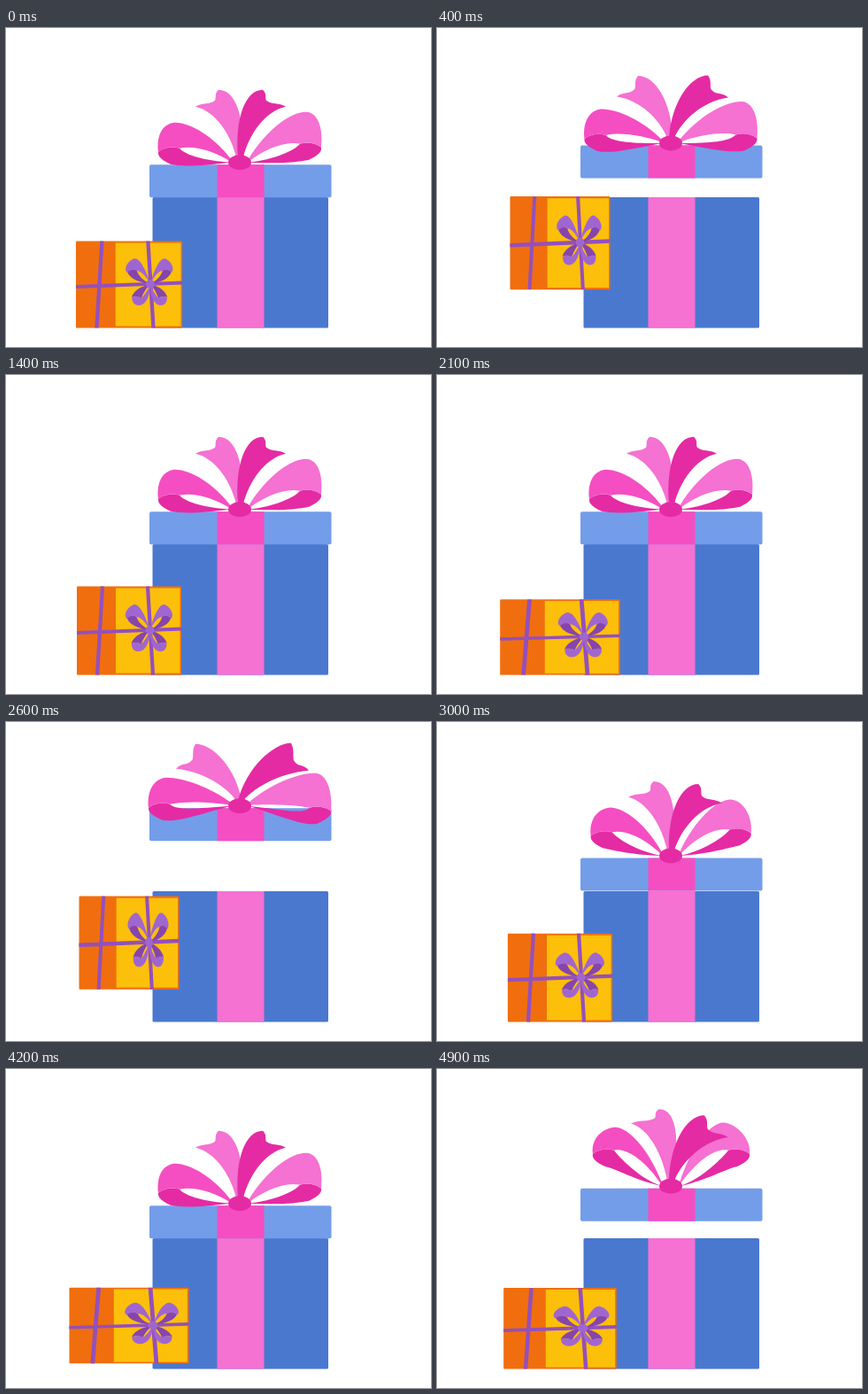
Animation, 480 px wide and 360 px high, one loop 5 s. Source, as an HTML page:

```html
<!DOCTYPE html>
<html lang="en">
<head>
<meta charset="utf-8">
<title>Jumping gifts</title>
<style>
  html, body { margin: 0; width: 100%; height: 100%; overflow: hidden; background: #fff; }
  svg { display: block; width: 100vw; height: 100vh; }
</style>
</head>
<body>
<svg viewBox="0 0 480 360">
  <rect x="165.5" y="191" width="198.5" height="147.5" rx="1.5" fill="#4a78cf"/>
  <rect x="238.5" y="191" width="53" height="147.5" fill="#f571d2"/>

  <g id="lid">
    <rect x="162" width="205.5" height="37" rx="2" fill="#739de9"/>
    <rect x="238.5" width="53" height="37" fill="#f54ec2"/>
    <g transform="translate(264 -2.5)">
      <path id="under-left" fill="#e42ba4"/>
      <path id="loop-left" fill="#f54ec2"/>
      <path id="under-right" fill="#e42ba4"/>
      <path id="loop-right" fill="#f571d2"/>
      <path id="tail-left" fill="#f571d2"/>
      <path id="tail-right" fill="#e42ba4"/>
      <ellipse rx="13" ry="8.5" fill="#e42ba4"/>
    </g>
  </g>

  <!-- Small gift: origin at the middle of its base -->
  <g id="gift">
    <rect x="-59" y="-100" width="118" height="100" rx="1" fill="#f06e0e"/>
    <rect x="-15" y="-98" width="72.5" height="96" fill="#fcbf0a"/>
    <path d="M-30-100L-36 0M-59-47.5L59-52M21-100L27 0" fill="none" stroke="#9450bb" stroke-width="4.2"/>
  </g>
  <g id="knot">
    <g id="wing">
      <path fill="#8645ad" d="M-26-14C-22-18-18-17-15-15C-13-8-6-3 0 0C-10-2-22-4-26-14Z"/>
      <path fill="#a066d0" d="M0 0C-4-14-12-32-19-28.500C-27-25-30-16-26-13C-22-17-18-17-15-15C-10-15-4-8 0 0Z"/>
      <path fill="#8645ad" d="M0 0C-8 2-18 6-21 15C-17 13-13 14-10 16C-8 10-4 4 0 0Z"/>
      <path fill="#a066d0" d="M0 0C0 12-4 24-13 24C-18 24-21 20-20.500 15C-16 13-12 14-10 16C-6 12-2 6 0 0Z"/>
    </g>
    <use href="#wing" transform="scale(-.92 1)"/>
    <circle r="5" fill="#a066d0"/>
  </g>
</svg>
<script>
const LOOP = 5000, HOP = 2000, STEP = 100;
const $ = id => document.getElementById(id);

// Key points of each side, from the knot: loop top, loop end, tail tip, tail top
const poses = {
  rest: {
    left: [[-74, -45], [-92, -12], [-50, -63], [-24, -82]],
    right: [[76, -57], [92, -17], [52, -63], [26, -82]]
  },
  flat: {
    left: [[-84, -32], [-103, 2], [-72, -42], [-50, -70]],
    right: [[86, -37], [103, 6], [78, -40], [58, -71]]
  },
  tall: {
    left: [[-64, -67], [-88, -37], [-45, -71], [-13, -87]],
    right: [[60, -72], [89, -37], [65, -55], [38, -80]]
  }
};

const mix = (a, b, k) => a + (b - a) * k;

function ease(t, from, to) {
  const k = Math.min(1, Math.max(0, (t - from) / (to - from)));
  return (1 - Math.cos(Math.PI * k)) / 2;
}

// 1 plus soft pulses, each [size, centre, width]
const wobble = (t, ...pulses) => pulses.reduce(
  (sum, [size, mid, width]) => sum + size * Math.exp(-(((t - mid) / width) ** 2)), 1);

function setPath(id, start, ...curves) {
  $(id).setAttribute('d', `M${start}C${curves.join(' ')}Z`);
}

// s is -1 on the left and 1 on the right
function drawLoop(side, s, [tx, ty], [ex, ey]) {
  const [hx, hy] = [ex - s * 24, ey - 4];
  const [bx, by] = [ex * .85, ey + 14];
  const fold = [[ex - s * 8, ey - 6], [hx + s * 7, hy - 2], [hx, hy]];
  setPath('loop-' + side, [s * 10, -4],
    [tx * .4, ty * .66], [tx * .77, ty * 1.02], [tx, ty],
    [tx + s * 15, ty + 2], [ex + s * 2, ey - 16], [ex, ey],
    ...fold,
    [hx * .74, hy - 4], [hx * .38, hy * .5 - 3], [s * 10, -1]);
  setPath('under-' + side, [ex, ey],
    ...fold,
    [hx * .9, hy + 8], [hx * .57, hy * .3 + 3], [s * 10, 0],
    [bx * .55, by * .45 + 3], [bx * .82, by + 3], [bx, by],
    [bx + s * 8, by - 4], [ex + s, ey + 6], [ex, ey]);
}

function drawTail(side, s, tip, top) {
  const between = (kx, ky) => [mix(tip[0], top[0], kx), mix(tip[1], top[1], ky)];
  setPath('tail-' + side, [s * 4, -6],
    [tip[0] * .2, tip[1] * .5], [tip[0] * .55, tip[1] * .92], tip,
    between(.3, .26), between(.62, .1), between(.85, .37),
    between(.92, .58), between(.8, .74), top,
    [top[0] - s * 20, top[1]], [top[0] * .4 - s * 16, top[1] * .6], [-s * 2, -6]);
}

// Above 0 the bow flattens, below 0 it stretches upwards.
function drawBow(pose) {
  const goal = pose > 0 ? poses.flat : poses.tall;
  for (const [side, s] of [['left', -1], ['right', 1]]) {
    const [loopTop, loopEnd, tailTip, tailTop] = poses.rest[side].map(
      (point, i) => point.map((v, j) => mix(v, goal[side][i][j], Math.abs(pose))));
    drawLoop(side, s, loopTop, loopEnd);
    drawTail(side, s, tailTip, tailTop);
  }
}

function drawLid(t) {
  const lift = 63 * (ease(t, 200, 700) - ease(t, 700, 1020));
  $('lid').setAttribute('transform', `translate(0 ${154.2 - lift})`);
  drawBow(t < 750 ? ease(t, 200, 600) : ease(t, 880, 1100) - 1);
}

function drawGift(t) {
  const sy = wobble(t, [-.19, 150, 100], [.07, 500, 180], [-.2, 825, 82]);
  const sx = sy ** -.87;
  const base = 338.5 - Math.max(0, 46 * (1 - ((t - 470) / 290) ** 2));
  const k = wobble(t, [.14, 200, 100], [-.15, 550, 150], [.18, 900, 80]);
  $('gift').setAttribute('transform', `translate(139 ${base}) scale(${sx} ${sy})`);
  $('knot').setAttribute('transform',
    `translate(${139 + 23.5 * sx} ${base - 50.5 * sy}) scale(${k} ${1 / k})`);
}

const start = performance.now();
function tick() {
  const time = (performance.now() - start) % LOOP;
  const t = Math.floor(time / STEP) * STEP % HOP;
  drawLid(t);
  drawGift(t);
  requestAnimationFrame(tick);
}
tick();
</script>
</body>
</html>
```
